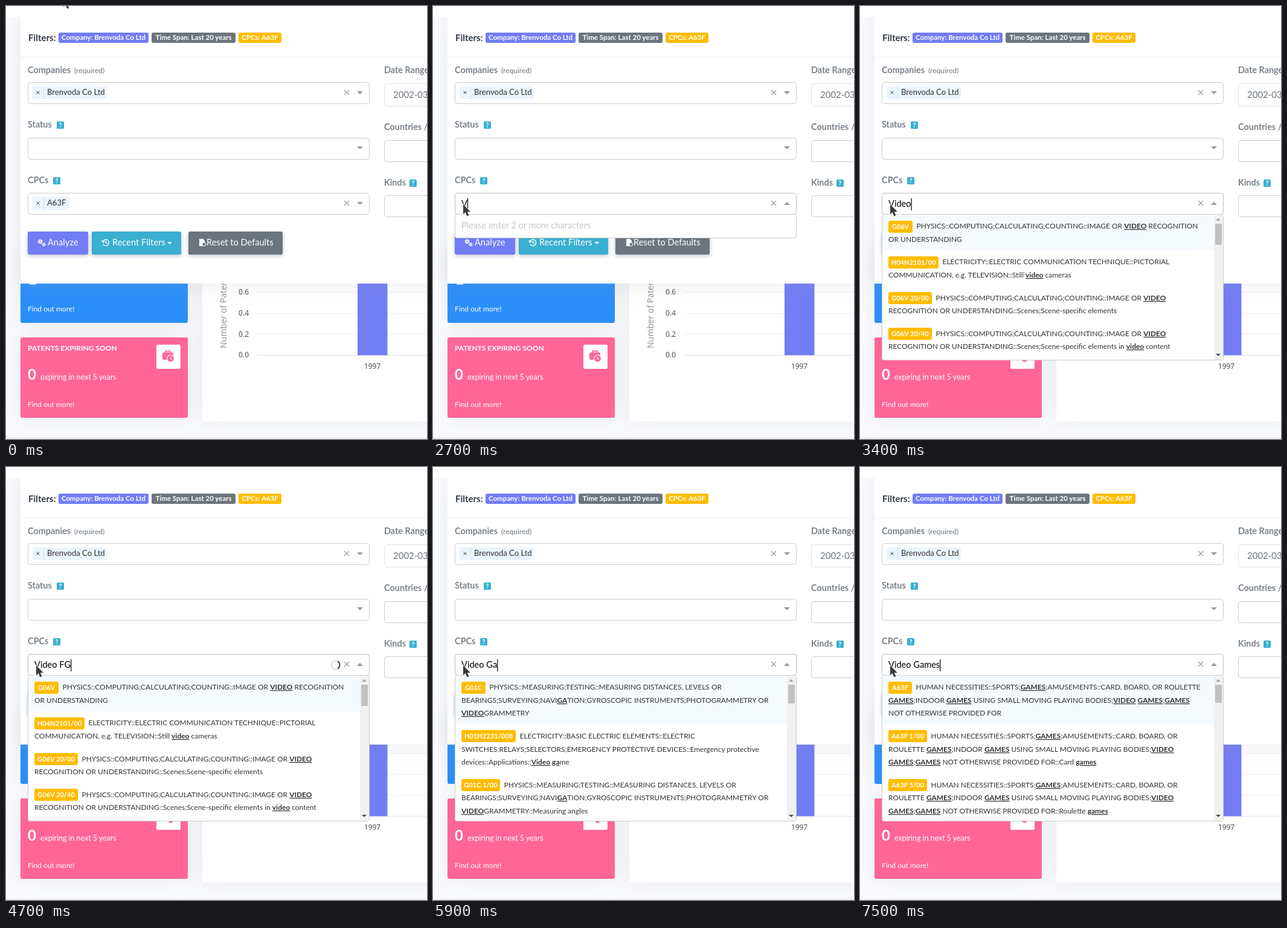
An HTML page for the animation above (8000 ms loop, 697x716 px).

```html
<!DOCTYPE html>
<html lang="en">
<head>
<meta charset="utf-8">
<title>Patent filters</title>
<style>
html, body { margin: 0; width: 100%; height: 100%; overflow: hidden; background: #fafbfe; }
svg { display: block; width: 100%; height: 100%; }
text { font-family: Lato, "Open Sans", sans-serif; font-size: 14.6px; fill: #6c757d; white-space: pre; }
.label { font-weight: 600; font-size: 14.5px; }
.small { font-size: 12px; }
.pill { font-weight: 700; font-size: 11.5px; fill: #fff; text-anchor: middle; }
.code { font-size: 11.1px; }
.tag { font-size: 13.1px; fill: #333; }
.white { fill: #fff; }
.row { font-size: 11.96px; fill: #333; }
.hit { font-weight: 700; text-decoration: underline; }
.hint { fill: #c8c8c8; }
.axis { font: 12px "Open Sans", sans-serif; fill: #444; }
.title { font: 14px "Open Sans", sans-serif; fill: #8a8f96; }
.box { fill: #fff; stroke: #ccc; }
.cross { stroke: #999; stroke-width: 1.1; fill: none; }
.raise { filter: drop-shadow(0 0 17px rgba(154, 161, 171, .2)); }
.button { filter: drop-shadow(0 2px 3px rgba(90, 100, 140, .42)); }
</style>
</head>
<body>
<svg viewBox="0 0 697 716" preserveAspectRatio="none">
  <defs>
    <g id="help">
      <rect width="12" height="12" rx="1.6" fill="#39afd1"/>
      <text x="6" y="9.7" style="font-size:10.5px;font-weight:700;fill:#fff;text-anchor:middle">?</text>
    </g>
    <path id="down" d="M-5 0H5L0 5Z" fill="#999"/>
    <path id="clear" class="cross" d="M-4-4 4 4M4-4-4 4"/>
    <path id="remove" d="M-2.5-2.5 2.5 2.5M2.5-2.5-2.5 2.5" stroke="#333" stroke-width=".9"/>
    <g id="cog" fill="none" stroke="#fff">
      <circle r="2.6" stroke-width="2"/>
      <circle r="4.1" stroke-width="1.4" stroke-dasharray="1.6 1.62"/>
    </g>
  </defs>

  <rect width="697" height="716" fill="#fafbfe"/>

  <!-- page below the filter panel -->
  <rect class="raise" x="325" y="400" width="400" height="287" fill="#fff"/>
  <g stroke="#eee">
    <path d="M416 473.5H697M416 508.5H697M416 542.5H697"/>
    <path d="M416 577.5H697" stroke="#e4e4e4"/>
  </g>
  <rect x="582" y="440" width="49.5" height="137.5" fill="#727cf5"/>
  <g text-anchor="end">
    <text class="axis" x="402" y="477">0.6</text>
    <text class="axis" x="402" y="512">0.4</text>
    <text class="axis" x="402" y="547">0.2</text>
    <text class="axis" x="402" y="581">0.0</text>
  </g>
  <text class="axis" x="606.5" y="600" text-anchor="middle">1997</text>
  <text class="title" transform="translate(365 566) rotate(-90)">Number of Patents</text>

  <rect class="raise" x="24" y="400" width="277" height="124" rx="3" fill="#2c8ef8"/>
  <rect x="39" y="458" width="11" height="2.6" fill="#fff"/>
  <text class="small white" x="36" y="505">Find out more!</text>

  <rect class="raise" x="24" y="548" width="277" height="133" rx="3" fill="#ff6697"/>
  <text class="small white" x="36" y="570" font-weight="700">PATENTS EXPIRING SOON</text>
  <text class="white" x="36" y="618" style="font-size:24px;font-weight:700">0</text>
  <text class="white" x="57" y="618" style="font-size:12.4px">expiring in next 5 years</text>
  <text class="small white" x="36" y="663">Find out more!</text>
  <rect x="249" y="560" width="40" height="40" rx="2" fill="#fff"/>
  <g fill="#ff6697">
    <rect x="259" y="573" width="18" height="12" rx="2"/>
    <path d="M264.5 573v-2.5h7v2.5" fill="none" stroke="#ff6697" stroke-width="2"/>
    <circle cx="272.5" cy="583" r="6" stroke="#fff" stroke-width="1.2"/>
    <path d="M272.5 580v3.2l2.2 1.4" fill="none" stroke="#fff" stroke-width="1.2"/>
  </g>
  <path d="M0 714.5H697" stroke="#e0e2e7"/>

  <!-- filter panel -->
  <rect class="raise" x="24" y="18" width="760" height="441" fill="#fff"/>
  <rect width="697" height="18" fill="#fff"/>
  <path d="M24 84.5H697" stroke="#eef0f3"/>
  <text x="37" y="58" style="font-size:15px;font-weight:700;fill:#313a46">Filters:</text>
  <rect x="87" y="44" width="149" height="17" rx="3" fill="#727cf5"/>
  <text class="pill" x="161.5" y="56">Company: Brenvoda Co Ltd</text>
  <rect x="241" y="44" width="139" height="17" rx="3" fill="#6c757d"/>
  <text class="pill" x="310.5" y="56">Time Span: Last 20 years</text>
  <rect x="385" y="44" width="71" height="17" rx="3" fill="#ffbc00"/>
  <text class="pill" x="420.5" y="56">CPCs: A63F</text>

  <text class="label" x="36" y="111">Companies</text>
  <text class="small" x="113" y="111">(required)</text>
  <rect class="box" x="36.5" y="126.5" width="565" height="35" rx="4"/>
  <rect x="44" y="133" width="123" height="21" rx="2" fill="#ebf5ff"/>
  <path d="M62.5 133v21" stroke="#c2e0ff"/>
  <use href="#remove" x="53" y="143"/>
  <text class="tag" x="68" y="147">Brenvoda Co Ltd</text>
  <use href="#clear" x="564" y="143"/>
  <use href="#down" x="586" y="141"/>

  <text class="label" x="36" y="201">Status</text>
  <use href="#help" x="84" y="191"/>
  <rect class="box" x="36.5" y="218.5" width="565" height="35" rx="4"/>
  <use href="#down" x="586" y="232"/>

  <text class="label" x="36" y="293">CPCs</text>
  <use href="#help" x="78" y="283"/>

  <text class="label" x="626" y="111">Date Range</text>
  <rect x="626.5" y="128.5" width="120" height="37" rx="4" fill="#fff" stroke="#dee2e6"/>
  <text x="641" y="152" style="font-size:15px">2002-03</text>
  <text class="label" x="626" y="205">Countries / </text>
  <rect class="box" x="626.5" y="222.5" width="120" height="35" rx="4"/>
  <text class="label" x="626" y="297">Kinds</text>
  <use href="#help" x="668" y="287"/>
  <rect class="box" x="626.5" y="313.5" width="120" height="35" rx="4"/>

  <g class="button">
    <rect x="36" y="373" width="100" height="38" rx="2.5" fill="#727cf5"/>
    <rect x="142" y="373" width="148" height="38" rx="2.5" fill="#39afd1"/>
    <rect x="302" y="373" width="156" height="38" rx="2.5" fill="#6c757d"/>
  </g>
  <use href="#cog" transform="translate(56.5 389.5) scale(.85)"/>
  <use href="#cog" transform="translate(62.5 394.5) scale(.68)"/>
  <text class="white" x="69" y="396">Analyze</text>
  <g fill="none" stroke="#fff" stroke-width="1.4">
    <path d="M160.5 389.5a5.2 5.2 0 1 1 .2 4M165.5 388v3.6l2.6 1.6"/>
    <path d="M158.5 387.5l2 3.4 3-2.2"/>
  </g>
  <text class="white" x="176" y="396">Recent Filters</text>
  <path d="M267 390h8l-4 4Z" fill="#fff"/>
  <path d="M320 385h6l3 3v9h-9Z" fill="#fff"/>
  <circle cx="328" cy="394" r="3" fill="#6c757d" stroke="#fff"/>
  <text class="white" x="332" y="396">Reset to Defaults</text>

  <!-- code search -->
  <rect id="ring" x="34.5" y="307.5" width="569" height="39" rx="5.5" fill="none" stroke="#007eff" stroke-opacity=".1" stroke-width="3"/>
  <rect id="field" class="box" x="36.5" y="309.5" width="565" height="35" rx="4"/>
  <g id="code">
    <rect x="44" y="316" width="61" height="21" rx="2" fill="#ebf5ff"/>
    <rect id="hover" x="44" y="316" width="18" height="21" fill="#cfe7fb"/>
    <path d="M62.5 316v21" stroke="#c2e0ff"/>
    <use href="#remove" x="53" y="326"/>
    <text class="tag" x="68" y="330">A63F</text>
  </g>
  <use id="wipe" href="#clear" x="564" y="326"/>
  <use id="arrow" href="#down"/>
  <text id="typed" x="47" y="332" style="fill:#000"></text>
  <rect id="caret" y="318" width="1.2" height="20"/>
  <g id="spin" fill="none" stroke="#424242" stroke-width="2">
    <circle r="7" stroke-opacity=".2"/>
    <path d="M-3.5 6.06A7 7 0 0 1-3.5-6.06"/>
  </g>

  <g id="short">
    <rect class="box" x="36.5" y="344.5" width="565" height="39" rx="3"/>
    <text id="hint" class="hint" x="47" y="368"></text>
  </g>
  <g id="long">
    <rect class="box" x="36.5" y="344.5" width="565" height="241" rx="3"/>
    <g id="lists"></g>
    <rect x="586" y="345" width="15" height="240" fill="#f1f1f1"/>
    <path d="M589 355h8l-4-4Z" fill="#a3a3a3"/>
    <path d="M589 575h8l-4 4Z" fill="#505050"/>
    <rect id="thumb" x="588" y="360" width="11" fill="#c1c1c1"/>
  </g>

  <g id="mouse" fill="#3b3b3b" stroke="#fff" stroke-width="1.2" paint-order="stroke">
    <path id="pointer" d="M0 0V16.5L3.8 13 6.3 19.5 9.4 18.2 7 12.2H12Z"/>
    <path id="hand" d="M2 1.6a1.6 1.6 0 0 1 3.2 0V7l7 1.5q2.3.6 2.2 3l-.6 5-1.4 4H5L.6 14.2q-1.4-2 .4-2.7L2 12Z"/>
  </g>
</svg>

<script>
const $ = id => document.getElementById(id);
const show = (id, on) => $(id).setAttribute('visibility', on ? 'inherit' : 'hidden');
const place = (id, x, y, more = '') => $(id).setAttribute('transform', `translate(${x} ${y}) ${more}`);

const image = 'PHYSICS::COMPUTING;CALCULATING;COUNTING::IMAGE OR *VIDEO*';
const measure = ['PHYSICS::MEASURING;TESTING::MEASURING DISTANCES, LEVELS OR',
  'BEARINGS;SURVEYING;NAVI*GA*TION;GYROSCOPIC INSTRUMENTS;PHOTOGRAMMETRY OR'];
const sport = ['HUMAN NECESSITIES::SPORTS;*GAMES*;AMUSEMENTS::CARD, BOARD, OR',
  'ROULETTE *GAMES*;INDOOR *GAMES* USING SMALL MOVING PLAYING BODIES;*VIDEO*'];
const other = '*GAMES*;*GAMES* NOT OTHERWISE PROVIDED FOR::';

// each entry: code, badge width, lines
const results = {
  video: { thumb: 35, items: [
    ['G06V', 40, image + ' RECOGNITION', 'OR UNDERSTANDING'],
    ['H04N2101/00', 83, 'ELECTRICITY::ELECTRIC COMMUNICATION TECHNIQUE::PICTORIAL',
      'COMMUNICATION, e.g. TELEVISION::Still *video* cameras'],
    ['G06V 20/00', 72, image, 'RECOGNITION OR UNDERSTANDING::Scenes;Scene-specific elements'],
    ['G06V 20/40', 72, image, 'RECOGNITION OR UNDERSTANDING::Scenes;Scene-specific elements in *video* content']
  ] },
  ga: { thumb: 31, items: [
    ['G01C', 40, ...measure, '*VIDEO*GRAMMETRY'],
    ['H01H2231/008', 90, 'ELECTRICITY::BASIC ELECTRIC ELEMENTS::ELECTRIC',
      'SWITCHES;RELAYS;SELECTORS;EMERGENCY PROTECTIVE DEVICES::Emergency protective',
      'devices::Applications::*Video* *ga*me'],
    ['G01C 1/00', 64, ...measure, '*VIDEO*GRAMMETRY::Measuring angles']
  ] },
  games: { thumb: 30, items: [
    ['A63F', 39, sport[0] + ' ROULETTE',
      '*GAMES*;INDOOR *GAMES* USING SMALL MOVING PLAYING BODIES;*VIDEO* *GAMES*;*GAMES*',
      'NOT OTHERWISE PROVIDED FOR'],
    ['A63F 1/00', 64, ...sport, other + 'Card *games*'],
    ['A63F 5/00', 64, ...sport, other + 'Roulette *games*']
  ] }
};

function drawList(name) {
  let top = 345, out = '';
  results[name].items.forEach(([code, width, ...lines], i) => {
    const height = 16 + 21.6 * lines.length;
    const badge = Math.round(top + 9.5);
    if (!i) out += `<rect x="37" y="345" width="549" height="${Math.round(height)}" fill="#f5faff"/>`;
    out += `<rect x="47" y="${badge}" width="${width}" height="20" rx="3" fill="#ffbc00"/>`;
    out += `<text class="pill code" x="${47 + width / 2}" y="${badge + 14}">${code}</text>`;
    lines.forEach((line, n) => {
      const marked = line.replace(/\*(.*?)\*/g, '<tspan class="hit">$1</tspan>');
      const base = Math.round(top + 23.2 + 21.6 * n);
      out += `<text class="row" x="${n ? 47 : 53.5 + width}" y="${base}">${marked}</text>`;
    });
    top += height;
  });
  return `<g id="list-${name}">${out}</g>`;
}
$('lists').innerHTML = Object.keys(results).map(drawList).join('');

// time, typed text, dropdown content, loading
const enter = 'Please enter 2 or more characters', wait = 'Loading...';
const steps = [
  [1500, '', '', 0],
  [2700, 'V', enter, 0],
  [2900, 'Vi', wait, 1],
  [3000, 'Vid', wait, 1],
  [3200, 'Vide', wait, 1],
  [3300, 'Video', wait, 1],
  [3400, 'Video', 'video', 0],
  [4100, 'Video ', 'video', 0],
  [4300, 'Video F', 'video', 1],
  [4500, 'Video FG', 'video', 1],
  [5200, 'Video F', 'video', 1],
  [5300, 'Video ', 'video', 1],
  [5400, 'Video G', 'video', 1],
  [5600, 'Video Ga', 'video', 1],
  [5800, 'Video Ga', 'ga', 0],
  [6000, 'Video Gam', 'ga', 1],
  [6100, 'Video Game', 'ga', 1],
  [6300, 'Video Games', 'games', 0]
];

function drawMouse(t) {
  let x = 95, y = -15, hand = false;
  if (t >= 1600) [x, y] = [50, 328];
  else if (t >= 1300) [x, y, hand] = [47, 329, true];
  else if (t >= 300) {
    const k = Math.min(8, Math.floor(t / 100) - 2);
    const p = 1 - (1 - k / 8) ** 1.8;
    x -= 53 * p;
    y += 346 * p;
    hand = k > 6;
  }
  place('mouse', x, y);
  show('hand', hand);
  show('pointer', !hand);
  show('hover', hand && t < 1500);
}

function drawSearch(t) {
  let text = '', list = '', busy = 0, busyFrom = 0, key = 1500;
  for (const [at, word, content, loading] of steps) {
    if (t < at) break;
    if (word !== text) key = at;
    if (loading && !busy) busyFrom = at;
    [text, list, busy] = [word, content, loading];
  }
  const active = t >= 1500, found = results[list];
  show('code', !active);
  show('wipe', !active || text);
  show('ring', active && !list);
  $('field').style.stroke = active && !list ? '#007eff' : list ? '#bdbdbd' : '#ccc';
  place('arrow', 586, list ? 329 : 324, list ? 'scale(1 -1)' : '');

  $('typed').textContent = text;
  $('caret').setAttribute('x', 47 + (text ? $('typed').getComputedTextLength() : 0));
  show('caret', active && (t - key) % 1200 < 600);
  show('spin', busy);
  place('spin', 545.5, 327.5, `rotate(${(t - busyFrom) * .45})`);

  show('short', list && !found);
  $('hint').textContent = found ? '' : list;
  show('long', found);
  for (const name in results) show('list-' + name, found && name === list);
  if (found) $('thumb').setAttribute('height', found.thumb);
}

const start = performance.now();
function frame() {
  const t = (performance.now() - start) % 8000;
  drawMouse(t);
  drawSearch(t);
  requestAnimationFrame(frame);
}
frame();
</script>
</body>
</html>
```
